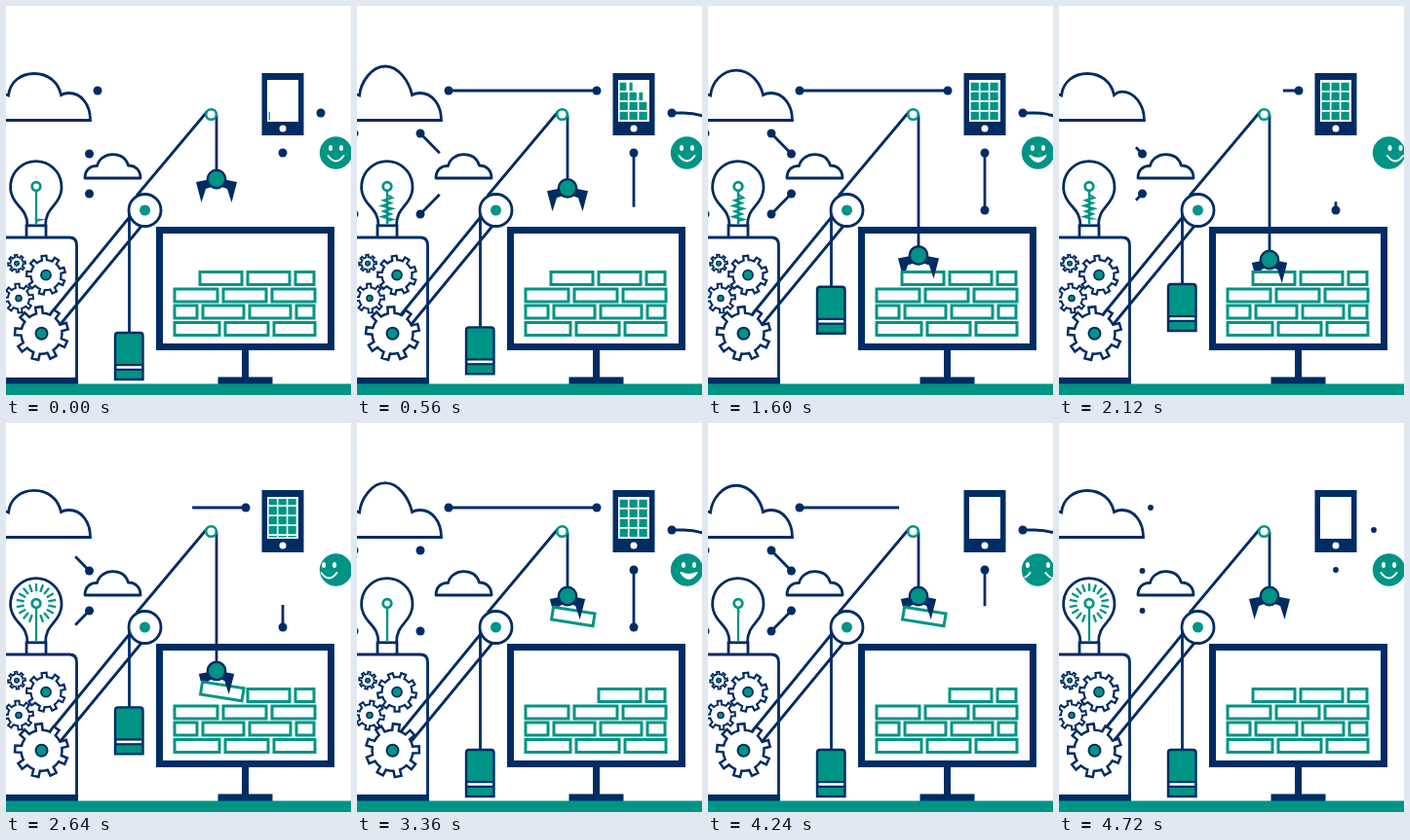
Recreate the animation shown at these times as an HTML page. Size 354 px wide and 400 px high, loop 4.76 s.

```html
<!DOCTYPE html>
<html lang="en">
<head>
<meta charset="utf-8">
<title>Workshop</title>
<style>
html, body { margin: 0; width: 100%; height: 100%; overflow: hidden; background: #fff; }
svg { display: block; width: 354px; height: 400px; }
.n { stroke: #002c64; stroke-width: 2.8; fill: #fff; }
.l { stroke: #002c64; stroke-width: 2.8; fill: none; }
.t { stroke: #009485; stroke-width: 2.3; fill: none; }
.b { stroke: #009485; stroke-width: 3; fill: #fff; }
.nf { fill: #002c64; }
.tf { fill: #009485; }
.hub { fill: #009485; stroke: #002c64; stroke-width: 2.4; }
</style>
</head>
<body>
<svg id="stage" viewBox="0 0 354 400" xmlns="http://www.w3.org/2000/svg">
  <defs>
    <clipPath id="screen"><rect x="269" y="78" width="30" height="39.5"/></clipPath>
    <clipPath id="head"><circle cx="338.5" cy="151" r="16"/></clipPath>
    <clipPath id="coil"><rect id="coilBox" x="20" width="24"/></clipPath>
    <g id="face">
      <ellipse cx="333" cy="146" rx="2" ry="3" fill="#fff"/>
      <ellipse cx="344" cy="146" rx="2" ry="3" fill="#fff"/>
      <path id="mouth" fill="#fff" stroke="#fff" stroke-width="2" stroke-linecap="round" stroke-linejoin="round"/>
    </g>
  </defs>
  <rect width="354" height="400" fill="#fff"/>
  <path id="cloud" class="n"/>
  <g id="links"></g>
  <path class="n" stroke-linejoin="round" d="M81 177H138C138 169 133 164 125.500 164C123 156 116.500 152.700 109.500 152.700C102 152.700 95 157 93.500 164.500C86 164 81 169 81 177Z"/>

  <path class="n" d="M22 226C22 212 14.500 208.300 9.300 200.800A26.200 26.200 0 1 1 52.300 200.800C47.100 208.300 40.500 212 40.500 226"/>
  <rect class="n" x="21" y="225.800" width="20" height="13"/>
  <path class="t" d="M31 190V224"/>
  <path id="zigzag" class="t" clip-path="url(#coil)"/>
  <path id="rays" class="t"/>
  <circle class="t" cx="31" cy="185.500" r="4.300" style="fill:#fff;stroke-width:2.800"/>

  <path class="n" d="M-5 238H65Q72.500 238 72.500 246V388H-5Z"/>
  <path class="nf" d="M0 382H74V389H0Z"/>
  <path class="l" d="M40 323.500L128 215.500M56 327L140 225M134 195L206 109"/>
  <g id="gears"></g>

  <path id="rope" class="l"/>
  <circle class="n" cx="142.500" cy="210" r="16.500"/>
  <circle class="tf" cx="142.500" cy="210" r="5.500"/>
  <g id="weight">
    <path class="hub" d="M112 384V339Q112 336 115 336H137.500Q140.500 336 140.500 339V384Z"/>
    <path stroke="#002c64" stroke-width="7" d="M113 371.500H139"/>
    <path stroke="#fff" stroke-width="2.600" d="M113.500 371.500H139"/>
  </g>

  <path class="nf" d="M154 227H337V354H154ZM242 353H249V382H242ZM217.500 381.500H273.500V389H217.500Z"/>
  <rect x="161" y="234" width="169" height="113" fill="#fff"/>
  <g id="wall"></g>
  <path id="cable" class="l"/>
  <path id="jawL" class="nf" d="M210 178L195 181L200.500 202L205 188L211 186Z"/>
  <rect id="brick" class="b" x="199" y="273.500" width="43" height="13"/>
  <path id="jawR" class="nf" d="M222 178L237 181L231.500 202L227 188L221 186Z"/>
  <circle id="claw" class="hub" cx="216" cy="178" r="9.200"/>
  <circle class="b" cx="210.500" cy="111.500" r="5.300" style="stroke-width:2.600"/>

  <rect class="nf" x="262.500" y="69" width="43" height="64"/>
  <rect x="268" y="76" width="32" height="43" fill="#fff"/>
  <circle cx="284" cy="126" r="3.500" fill="#fff"/>
  <path id="tiles" class="tf" clip-path="url(#screen)"/>

  <circle class="tf" cx="338.500" cy="151" r="16.700"/>
  <g clip-path="url(#head)"><use id="faceA" href="#face"/><use id="faceB" href="#face"/></g>
  <rect class="tf" y="388.500" width="354" height="11.500"/>
</svg>
<script>
const LOOP = 4760, HALF = LOOP / 2;
const $ = id => document.getElementById(id);
const set = (el, name, value) => el.setAttribute(name, value);
const ramp = (t, a, b) => Math.min(1, Math.max(0, (t - a) / (b - a)));
const ease = (t, a, b) => (1 - Math.cos(Math.PI * ramp(t, a, b))) / 2;

function add(parent, tag, attrs) {
  const el = document.createElementNS('http://www.w3.org/2000/svg', tag);
  for (const k in attrs) set(el, k, attrs[k]);
  parent.appendChild(el);
  return el;
}

function keyed(t, keys) {
  let i = 1;
  while (i < keys.length - 1 && t > keys[i][0]) i++;
  const [a, u] = keys[i - 1], [b, v] = keys[i];
  return u + (v - u) * ramp(t, a, b);
}

// Wall rows: y, then pairs of left and right edges
[[273.5, 248, 291, 297, 316], [291, 173, 217, 223, 267, 273, 317],
 [308, 173, 196, 202, 244, 250, 292, 298, 316], [325.5, 173, 219, 225, 269, 275, 317]
].forEach(([y, ...xs]) => {
  for (let i = 0; i < xs.length; i += 2)
    add($('wall'), 'rect', { class: 'b', x: xs[i], y, width: xs[i + 1] - xs[i], height: 13 });
});

function gearPath(n, inner, outer) {
  const step = 2 * Math.PI / n;
  const at = (r, a) => (r * Math.cos(a)).toFixed(2) + ' ' + (r * Math.sin(a)).toFixed(2);
  let d = '';
  for (let i = 0; i < n; i++) {
    const a = i * step;
    d += (i ? 'L' : 'M') + at(inner, a - step * .23) + 'L' + at(outer, a - step * .18) +
      'L' + at(outer, a + step * .18) + 'L' + at(inner, a + step * .23) +
      `A${inner} ${inner} 0 0 1 ` + at(inner, a + step * .77);
  }
  return d + 'Z';
}

// x, y, teeth, inner and outer radius, hub radius, direction, stroke
const gears = [
  [11, 264.7, 8, 6.5, 9, 2.3, 1, 1.8], [13, 300.5, 8, 11, 15, 3, 1, 2],
  [41, 276.7, 9, 15.5, 20, 5, -1, 2.2], [36.5, 336.7, 9, 21, 27.5, 6, 1, 2.5]
].map(([x, y, n, inner, outer, hub, dir, w]) => {
  const g = add($('gears'), 'g', { transform: `translate(${x} ${y})` });
  const rim = add(g, 'path', { class: 'n', d: gearPath(n, inner, outer), style: `stroke-width:${w}` });
  add(g, 'circle', { class: 'hub', r: hub, style: `stroke-width:${w * .8}` });
  return { rim, turn: dir * 360 * 9 / n };
});

// Each link goes out and back; span is one way: grow from/to, retract from/to
const wide = { span: HALF, legs: [[94, 554, 1709, 2169], [94, 554, 1709, 2169]] };
const tall = { span: HALF, legs: [[49, 590, 1660, 2201], [49, 590, 1660, 2201]] };
const fast = { span: HALF / 2, legs: [[50, 350, 550, 850], [50, 350, 726, 1026]] };
const links = [
  [wide, 94, 87, 246, 87], [tall, 284, 151, 284, 210],
  [wide, 323, 110, 392, 151, 'M323 110H335C362 110 386 126 392 151'],
  [fast, 85.5, 152, 65, 131], [fast, 85.5, 193, 65, 214],
  [fast, -23.5, 152, -3, 131], [fast, -23.5, 193, -3, 214]
].map(([kind, x1, y1, x2, y2, d]) => ({
  kind,
  line: add($('links'), 'path', { class: 'l', pathLength: 1, d: d || `M${x1} ${y1}L${x2} ${y2}` }),
  dots: [[x1, y1], [x2, y2]].map(([cx, cy]) => add($('links'), 'circle', { class: 'nf', cx, cy }))
}));

function drawLink({ kind, line, dots }, t) {
  const { span, legs } = kind;
  const back = Math.floor(t / span) % 2, v = t % span;
  const [g0, g1, r0, r1] = legs[back];
  const head = ramp(v, g0, g1), tail = ramp(v, r0, r1);
  const from = back ? 1 - head : tail, len = head - tail;
  set(line, 'stroke-dasharray', `0 ${from} ${len} 2`);
  set(line, 'visibility', len > 0 ? 'visible' : 'hidden');
  const r = 4.5 * (1 - .45 * Math.max(0, 1 - Math.abs(v - span + 50) / 50));
  set(dots[back], 'r', tail === 0 ? r : 0);
  set(dots[1 - back], 'r', head === 1 ? r : 0);
}

function drawCloud(t) {
  const p = t / (LOOP / 5) % 1;
  const bump = (c, w) => (1 + Math.cos(Math.PI * Math.min(1, Math.abs(p - c) / w))) / 2;
  const swell = bump(.2, .2);
  const top = 69.5 - 8 * bump(.55, .24), right = 86.5 + swell, lobe = 89.5 - 1.5 * swell;
  set($('cloud'), 'd', `M-30 117.500H${right}C${right} 101 77 ${lobe} 64.500 ${lobe}Q60 ${lobe} 56.500 91.500` +
    `C53.500 78 43 ${top} 29 ${top}C15 ${top} 4 78 2.500 92Q-1 90.500 -5 90.500C-20 90.500 -30 102 -30 117.500Z`);
}

let zig = 'M31 224L31 221';
for (let i = 0; i < 9; i++) zig += `L${31 + (i % 2 ? -1 : 1) * (i % 4 < 2 ? 5 : 3.5)} ${219.5 - i * 2.8}`;
set($('zigzag'), 'd', zig + 'L31 194V190');

function drawBulb(t) {
  const first = t < 2500;
  const head = first ? ramp(t, -120, 700) : ramp(t, 3400, 3850);
  const tail = first ? ramp(t, 2080, 2400) : ramp(t, 3950, 4300);
  set($('coilBox'), 'y', 224 - 36 * head);
  set($('coilBox'), 'height', 36 * Math.max(0, head - tail));
  const glow = Math.min(ramp(t, 2400, 2560), 1 - ramp(t, 2760, 2960)) +
    Math.min(ramp(t, 4320, 4480), 1 - ramp(t, 4730, 4760));
  let d = '';
  if (glow > 0) for (let i = 1; i < 18; i++) {
    const a = Math.PI / 2 + i * Math.PI / 9, c = Math.cos(a), s = Math.sin(a), r = 12.5 + 8 * glow;
    d += `M${31 + 12.5 * c} ${185.5 + 12.5 * s}L${31 + r * c} ${185.5 + r * s}`;
  }
  set($('rays'), 'd', d);
}

function drawCrane(t) {
  const down = ease(t, 200, 1850);
  const drop = 83 * (down - ease(t, 2500, 3300));
  const rise = 50 * (down - ease(t, 2440, 3300));
  const grip = 2.8 * (ease(t, 1900, 2120) - ease(t, 4280, 4440));
  set($('cable'), 'd', `M216 112V${170 + drop}`);
  set($('claw'), 'cy', 178 + drop);
  set($('jawL'), 'transform', `translate(${grip} ${drop})`);
  set($('jawR'), 'transform', `translate(${-grip} ${drop})`);
  set($('weight'), 'transform', `translate(0 ${-rise})`);
  set($('rope'), 'd', `M126.500 212V${336 - rise}`);
  const fall = ramp(t, 4320, 4500) ** 2;
  const hold = ease(t, 2300, 2500) * (1 - fall);
  set($('brick'), 'transform',
    `translate(${1.3 * hold} ${(drop - 81) * hold}) rotate(${9 * hold} 220.500 280)`);
}

function drawPhone(t) {
  const scroll = 40 * ease(t, 2300, 2924);
  let d = '';
  for (let row = 0; row < 8; row++) for (let col = 0; col < 3; col++) {
    const wait = (3 - row % 4) * 130 + col * 110;
    const w = 8.3 * (ramp(t, wait - 40, wait + 220) - ramp(t, 3480 + wait * .7, 3700 + wait * .7));
    if (w > 0) d += `M${269.6 + col * 9.9} ${78.8 + row * 10 - scroll}h${w}v8.200h${-w}Z`;
  }
  set($('tiles'), 'd', d);
}

function drawFace(t) {
  const x = keyed(t, [[0, 0], [1880, 0], [2120, 6.5], [2640, 25], [2880, 32], [3360, 34],
    [3800, 36], [4240, 48], [4640, 64], [LOOP, 64]]) % 32;
  set($('faceA'), 'x', x);
  set($('faceB'), 'x', x - 32);
  const open = ease(t, 500, 800) - ease(t, 1500, 1800) + ease(t, 2900, 3200) - ease(t, 3600, 3900);
  set($('mouth'), 'd', `M330.500 154Q338.500 ${165 + open} 346.500 154Q338.500 ${165 - 7 * open} 330.500 154Z`);
}

function draw(t) {
  gears.forEach(g => set(g.rim, 'transform', `rotate(${-96 + g.turn * t / LOOP})`));
  links.forEach(l => drawLink(l, t));
  drawCloud(t);
  drawBulb(t);
  drawCrane(t);
  drawPhone(t);
  drawFace(t);
}

function tick() {
  draw(Math.floor(performance.now() % LOOP / 40) * 40);
  requestAnimationFrame(tick);
}
tick();
</script>
</body>
</html>
```
